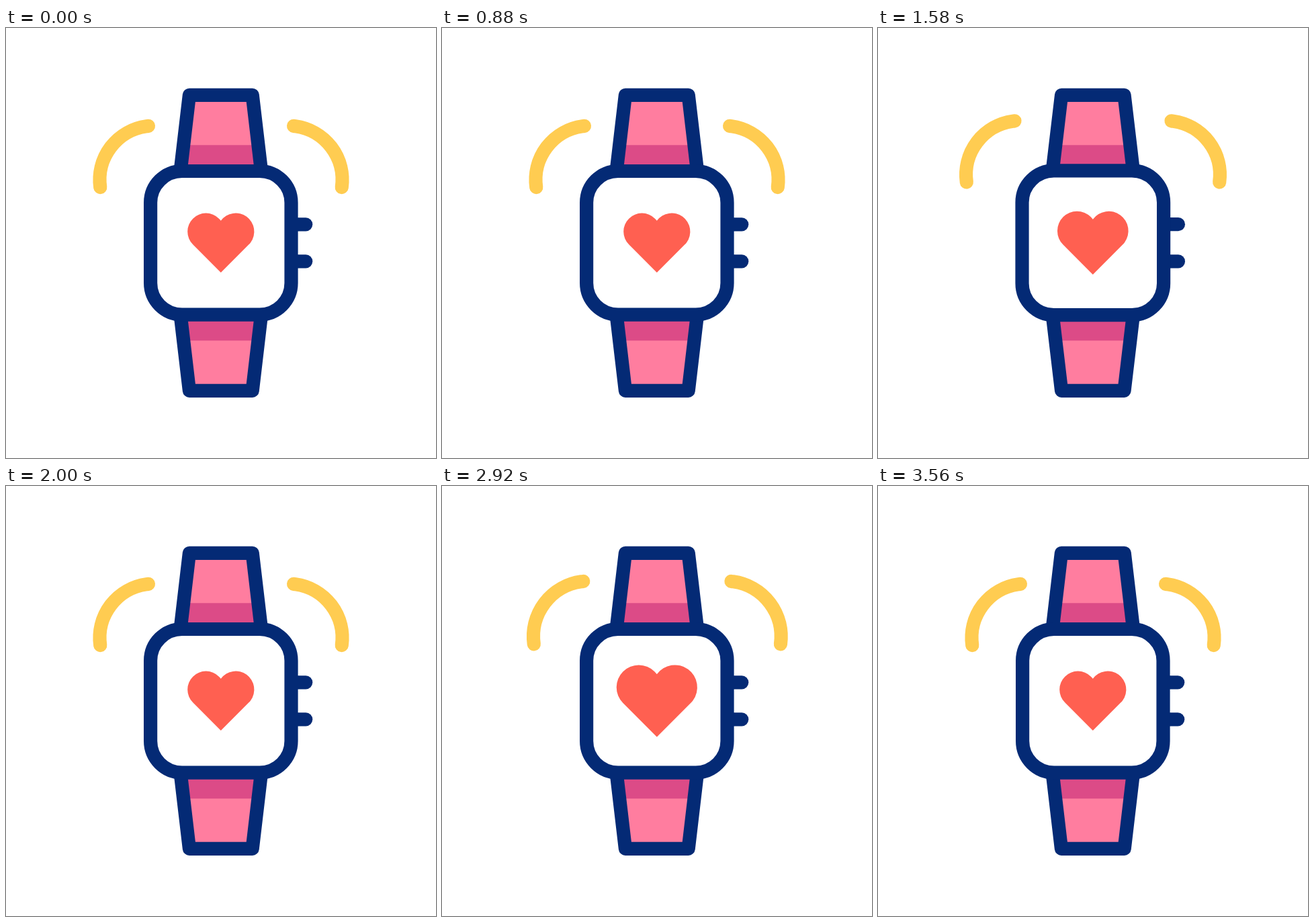
Recreate the animation shown at these times as an HTML page with a canvas. Size 640 by 640 pixels, loop 3.6 s.

```html
<!DOCTYPE html>
<html lang="en">
<head>
<meta charset="utf-8">
<title>Smartwatch heartbeat</title>
<style>
  html, body { margin: 0; width: 100%; height: 100%; overflow: hidden; background: #fff; }
  canvas { display: block; width: 640px; height: 640px; }
</style>
</head>
<body>
<canvas id="stage" width="640" height="640"></canvas>
<script>
const ctx = document.getElementById('stage').getContext('2d');
const LOOP = 3600, BEAT_START = 140, BEAT = 900;
const CX = 319.8, CY = 319.8;
const NAVY = '#042a75', PINK = '#ff7d9f', ROSE = '#dc4b87', RED = '#ff6051', YELLOW = '#ffcc51';

// Smooth rise and fall around a peak, zero beyond the given reach.
function bump(t, peak, reach) {
  const d = Math.min(1, Math.abs(t - peak) / reach);
  return .5 + .5 * Math.cos(Math.PI * d);
}

function trapezoid(top, low, a, b) {
  ctx.beginPath();
  ctx.moveTo(-b, low);
  ctx.lineTo(-a, top);
  ctx.lineTo(a, top);
  ctx.lineTo(b, low);
}

function drawStrap(side, end, base) {
  const half = y => end + (base - end) * (y - 100) / 103;
  const low = 212;
  ctx.save();
  ctx.translate(CX, CY);
  ctx.scale(1, side);
  ctx.translate(0, -320);
  trapezoid(100, low, end, half(low));
  ctx.fillStyle = PINK;
  ctx.fill();
  trapezoid(174.5, low, half(174.5), half(low));
  ctx.fillStyle = ROSE;
  ctx.fill();
  trapezoid(100, low, end, half(low));
  ctx.strokeStyle = NAVY;
  ctx.stroke();
  ctx.restore();
}

function drawBody(s) {
  const w = 104.7 * s, h = 106.8 * s;
  ctx.save();
  ctx.translate(CX, CY);
  ctx.strokeStyle = NAVY;
  for (const y of [-27.5, 27.5]) {
    ctx.beginPath();
    ctx.moveTo(w, y * s);
    ctx.lineTo(126.4 * s, y * s);
    ctx.stroke();
  }
  ctx.beginPath();
  ctx.roundRect(-w, -h, 2 * w, 2 * h, 47 * s);
  ctx.fillStyle = '#fff';
  ctx.fill();
  ctx.stroke();
  ctx.restore();
}

function drawHeart(s) {
  const q = Math.PI / 4;
  ctx.save();
  ctx.translate(CX, 319);
  ctx.scale(s, s);
  ctx.beginPath();
  ctx.moveTo(0, 45);
  ctx.arc(-22.2, -16, 27.4, 3 * q, -.63);
  ctx.arc(22.2, -16, 27.4, Math.PI + .63, q);
  ctx.closePath();
  ctx.fillStyle = RED;
  ctx.fill();
  ctx.restore();
}

// An arc that moves, turns and grows about its own middle.
function drawWave(side, out, up, turn, s) {
  ctx.save();
  ctx.translate(320, 0);
  ctx.scale(side, 1);
  ctx.translate(-144 - out, 191.5 - up);
  ctx.rotate(-turn);
  ctx.beginPath();
  ctx.arc(44 * s, 34.5 * s, 80.5 * s, 3.004, 4.612);
  ctx.strokeStyle = YELLOW;
  ctx.stroke();
  ctx.restore();
}

function draw(t) {
  // Two light beats, each with a wind-up, then two strong ones.
  const p = t < BEAT_START + 2 * BEAT ? (t - BEAT_START) % BEAT : 0;
  const dip = bump(p, 140, 140);
  const swell = bump(p, 410, 170);
  const lift = bump(p, 430, 230);
  const strong = bump(t, 2460, 280) + bump(t, 3170, 320);
  const throb = bump(t, 2400, 300) + bump(t, 3046, 300);

  ctx.fillStyle = '#fff';
  ctx.fillRect(0, 0, 640, 640);
  ctx.lineWidth = 20.2;
  ctx.lineCap = ctx.lineJoin = 'round';

  for (const side of [1, -1]) {
    const out = 13.7 * dip + 16 * lift + (25 - 3 * side) * strong;
    drawWave(side, out, 14.3 * lift + 24.3 * strong, .115 * dip, 1 - .02 * dip + .215 * strong);
  }
  const pinch = swell * swell;
  for (const side of [1, -1]) drawStrap(side, 46.9 - 12.2 * pinch, 59 - 5.5 * pinch);
  drawBody(1 - .017 * dip + .0455 * swell);
  drawHeart(1 + .07 * dip + .223 * bump(p, 420, 190) + .336 * throb);
}

const start = performance.now();
function tick() {
  draw((performance.now() - start) % LOOP);
  requestAnimationFrame(tick);
}
tick();
</script>
</body>
</html>
```
